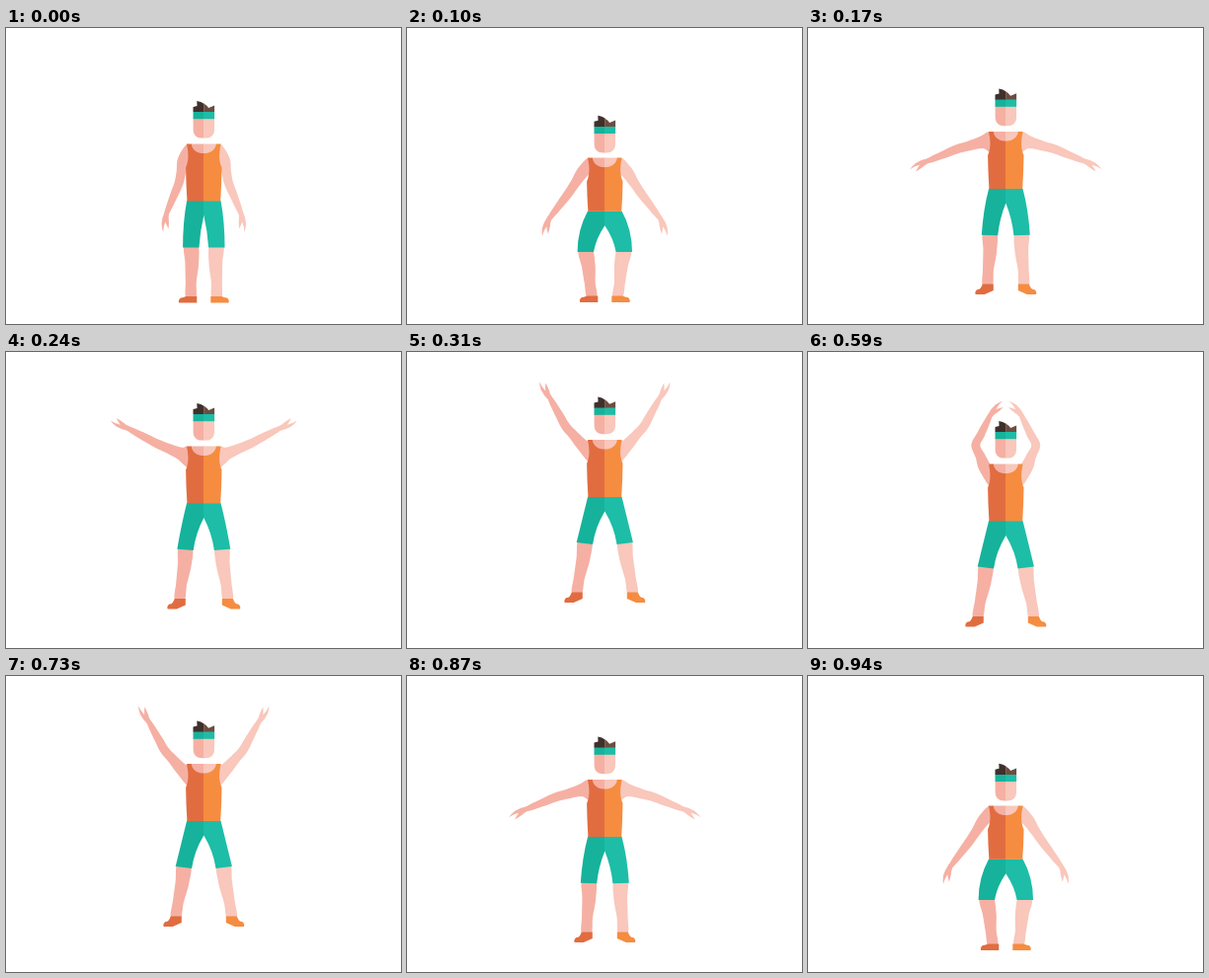
These frames come from a looping animation (400x300 px, 1010 ms). An HTML page:

```html
<!DOCTYPE html>
<html lang="en">
<head>
<meta charset="utf-8">
<title>Jumping jack</title>
<style>
  html, body { margin: 0; width: 100%; height: 100%; overflow: hidden; background: #fff; }
  svg { display: block; width: 100%; height: 100%; }
</style>
</head>
<body>
<svg id="stage" viewBox="0 0 400 300"></svg>
<script>
const NS = 'http://www.w3.org/2000/svg';
const CENTRE = 200.3, GROUND = 117.4;
const HOLD = 100, STEP = 70, LOOP = 1010, LAST = 7;

// jump: height of the shirt above its standing place; bend: 0 upright, 1 crouched;
// knee, foot: distance from the centre line;
// arm: angles of upper arm, forearm and hand, from hanging (0) to raised (180).
const stand = { jump: 0, bend: 0, knee: 13, foot: 13, arm: [12, 22, 10] };
const crouch = { jump: 0, bend: 1, knee: 19.5, foot: 13, arm: [34, 37, 22] };
const rise = { jump: 12.4, bend: 0, knee: 16.3, foot: 18.5, arm: [75, 68, 65] };
const apex = { jump: 28.4, bend: 0, knee: 20.4, foot: 28.5, arm: [138, 151, 147] };
const land = { ...apex, jump: 4, arm: [158, 206, 221] };
const squat = { ...land, bend: 1, knee: 26, arm: [158, 214, 225] };

function mix(a, b, t) {
  if (typeof a === 'number') return a + (b - a) * t;
  if (Array.isArray(a)) return a.map((v, i) => mix(v, b[i], t));
  return Object.fromEntries(Object.keys(a).map(k => [k, mix(a[k], b[k], t)]));
}

const poses = [stand, crouch, rise, mix(rise, apex, .6), apex, mix(apex, land, .45), land, squat];

// The jump plays forwards, then back, one held pose per step.
function poseAt(ms) {
  const t = ms % LOOP;
  const i = t < HOLD ? 0 : 1 + Math.floor((t - HOLD) / STEP);
  return poses[LAST - Math.abs(LAST - i)];
}

// Joints of one half of the body: x outwards from the centre, y down from the shirt's top.
function skeleton({ jump, bend, knee, foot, arm }) {
  const reach = (p, deg, len) => {
    const a = deg * Math.PI / 180;
    return [p[0] + len * Math.sin(a), p[1] + len * Math.cos(a)];
  };
  const shoulder = [18.8, 9.5];
  const elbow = reach(shoulder, arm[0], 31);
  const wrist = reach(elbow, arm[1], 33);
  return {
    shoulder, elbow, wrist,
    hand: reach(wrist, arm[2], 19.5),
    thumb: arm[1] < 100 ? 1 : -1,
    armpit: 18 + arm[0] / 30,
    waist: 58 - 3.6 * bend,
    knee: [knee, 105 - 9.3 * bend],
    ankle: [foot, 156 - 14.5 * bend],
    tilt: Math.max(0, foot - knee) / 4,
    toe: Math.min(1, jump / 4)
  };
}

const pt = p => p[0].toFixed(2) + ' ' + p[1].toFixed(2);

// Closed Catmull-Rom curve.
function smooth(pts) {
  const n = pts.length, at = i => pts[(i + n) % n];
  let d = 'M' + pt(pts[0]);
  for (let i = 0; i < n; i++) {
    const [a, b, c, e] = [at(i - 1), at(i), at(i + 1), at(i + 2)];
    const c1 = b.map((v, k) => v + (c[k] - a[k]) / 6);
    const c2 = c.map((v, k) => v - (e[k] - b[k]) / 6);
    d += `C${pt(c1)} ${pt(c2)} ${pt(c)}`;
  }
  return d + 'Z';
}

function direction(a, b) {
  const x = b[0] - a[0], y = b[1] - a[1], len = Math.hypot(x, y);
  return [x / len, y / len, len];
}

// Outline around a chain of points with a half width at each.
function limb(chain, widths, root = []) {
  const side = k => chain.map((p, i) => {
    const [dx, dy] = direction(chain[Math.max(0, i - 1)], chain[Math.min(chain.length - 1, i + 1)]);
    return [p[0] + k * dy * widths[i], p[1] - k * dx * widths[i]];
  });
  return smooth([...side(1), ...side(-1).reverse(), ...root]);
}

function armPath({ shoulder, elbow, wrist, armpit }) {
  const chain = [mix(shoulder, elbow, .2), mix(shoulder, elbow, .62), elbow, mix(elbow, wrist, .38), wrist];
  return limb(chain, [6.2, 4.9, 4.5, 4, 2.2], [[15.5, armpit], [14, 8], [17.2, .3]]);
}

function handPath({ wrist, hand, thumb }) {
  const [dx, dy, len] = direction(wrist, hand);
  const p = (u, v) => pt([wrist[0] + dx * u * len - dy * v * thumb, wrist[1] + dy * u * len + dx * v * thumb]);
  return `M${p(-.1, -2.2)}Q${p(.3, -4)} ${p(.6, -3.2)}Q${p(.85, -2)} ${p(1, 0)}` +
    `Q${p(.75, -1)} ${p(.45, .2)}Q${p(.6, 1.8)} ${p(.78, 4.6)}Q${p(.4, 4)} ${p(.2, 2.6)}L${p(-.1, 2.2)}Z`;
}

function shinPath({ knee, ankle }) {
  const calf = mix(knee, ankle, .3);
  const chain = [mix(knee, ankle, -.06), [calf[0] - 1, calf[1]], mix(knee, ankle, .68), ankle];
  return limb(chain, [6.7, 6.9, 5.5, 4.9]);
}

function shoePath({ ankle: [x, y], toe }) {
  const heel = x - 6, tip = x + 12.5, top = y - 1.5, sole = y + 5 + 4 * toe;
  return `M${heel} ${top}H${heel + 11}Q${heel + 13} ${sole - 5.5} ${tip - 4} ${sole - 5.2}` +
    `Q${tip} ${sole - 5} ${tip} ${sole - 1}Q${tip} ${sole} ${tip - 1} ${sole}` +
    `H${heel + 9}L${heel} ${sole - 4 * toe}Z`;
}

function shortsPath({ waist, knee: [x, y], tilt }) {
  const out = [x + 8.2, y - tilt / 2], inn = [x - 8.2, y + tilt / 2];
  const crotch = waist + 14.5;
  return `M-.3 ${waist - .3}H17.2Q${pt([out[0] - 3 * tilt, mix(waist, y, .45)])} ${pt(out)}L${pt(inn)}` +
    `Q${pt([inn[0] * .8, mix(y, crotch, .5)])} 0 ${crotch}H-.3Z`;
}

const shirtPath = ({ waist }) =>
  `M-.3 9.6C7 9.6 11.8 6 12.5 0H17.3C16.2 6 14.2 15 18.2 24Q18 40 16.9 ${waist}H-.3Z`;

const parts = [
  ['skin', shinPath],
  ['shirt', shoePath],
  ['shorts', shortsPath],
  ['skin', armPath],
  ['skin', handPath],
  ['skin', () => 'M-.3 0H13L11 8L6 11H-.3Z'],
  ['shirt', shirtPath],
  ['skin', () => 'M-.3 -26H10.7V-15C10.7 -8.5 7 -5.8 1.5 -5.8H-.3Z', true],
  ['shorts', () => 'M-.3 -32.5H10.8V-25.2H-.3Z', true]
];
const palettes = [
  { skin: '#f5b0a3', shirt: '#e16c40', shorts: '#16b29b' },
  { skin: '#f9c7bb', shirt: '#f68c40', shorts: '#1dbda7' }
];

function add(parent, tag, attrs = {}) {
  const el = parent.appendChild(document.createElementNS(NS, tag));
  for (const k in attrs) el.setAttribute(k, attrs[k]);
  return el;
}

const body = add(document.getElementById('stage'), 'g');
const shapes = [], heads = [];
palettes.forEach((colors, right) => {
  const half = add(body, 'g', { transform: `scale(${right ? 1 : -1} 1)` });
  for (const [color, path, onHead] of parts) {
    const el = add(half, 'path', { fill: colors[color] });
    shapes.push([el, path]);
    if (onHead) heads.push(el);
  }
});
const hair = add(body, 'g');
heads.push(hair);
add(hair, 'path', { fill: '#40302b', d: 'M-10.8 -32.3V-37.5L-6.8 -38.5L-7 -43.4Q-2.5 -43 .2 -40.6V-32.3Z' });
add(hair, 'path', { fill: '#6b4e42', d: 'M0 -32.3V-40.8Q3 -39 4.8 -36.3L10.8 -38.8V-32.3Z' });

let shown;
function draw(ms) {
  const pose = poseAt(ms);
  if (pose === shown) return;
  shown = pose;
  const bones = skeleton(pose);
  body.setAttribute('transform', `translate(${CENTRE} ${GROUND + 14 * pose.bend - pose.jump})`);
  for (const [el, path] of shapes) el.setAttribute('d', path(bones));
  for (const el of heads) el.setAttribute('transform', `translate(0 ${.8 * pose.bend})`);
}

const start = performance.now();
function tick() {
  draw(performance.now() - start);
  requestAnimationFrame(tick);
}
tick();
</script>
</body>
</html>
```
